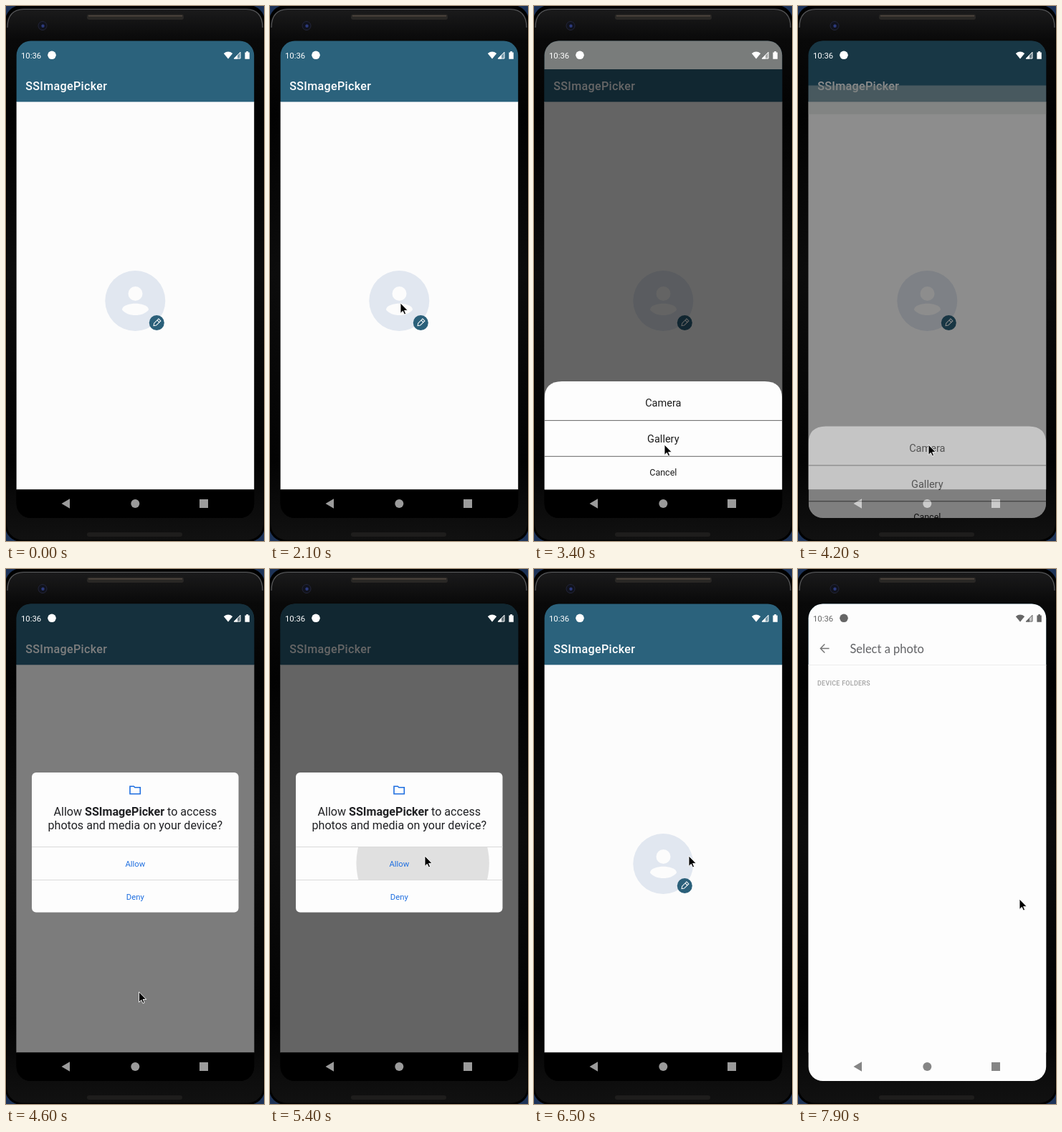
These frames come from a looping animation (360 by 744 pixels, 8 s). An HTML page:

```html
<!DOCTYPE html>
<html lang="en">
<head>
<meta charset="utf-8">
<title>Image picker demo</title>
<style>
  html, body { margin: 0; width: 100%; height: 100%; overflow: hidden; background: #1d3358; }
  svg { display: block; }
  text { font-family: Roboto, sans-serif; }
  .mid { text-anchor: middle; }
  .title { font-weight: 500; font-size: 16.1px; letter-spacing: .32px; fill: #fff; }
  .row { font-size: 14.5px; fill: #1c1c1c; }
  .cancel { font-size: 12.5px; fill: #1c1c1c; }
  .ask { font-size: 16.1px; fill: #202124; }
  .ask tspan { font-weight: 700; }
  .action { font-size: 11.3px; fill: #1f6fe0; }
  .heading { font-family: Lato, sans-serif; font-size: 16.5px; fill: #626366; }
  .label { font-size: 8.9px; letter-spacing: .3px; font-weight: 500; fill: #a2a2a2; }
</style>
</head>
<body>
<svg width="360" height="744" viewBox="0 0 360 744">
  <defs>
    <clipPath id="screenClip"><rect x="14.6" y="48.6" width="331.6" height="663.4" rx="20"/></clipPath>
    <clipPath id="allowClip"><rect x="36" y="387" width="288.5" height="45"/></clipPath>
    <linearGradient id="body" x2="0" y2="1">
      <stop offset="0" stop-color="#1b1b1c"/>
      <stop offset=".06" stop-color="#090909"/>
      <stop offset=".2" stop-color="#020202"/>
      <stop offset=".5" stop-color="#0c0c0c"/>
      <stop offset=".85" stop-color="#030303"/>
      <stop offset="1" stop-color="#111"/>
    </linearGradient>
    <g id="nav">
      <path d="M77.5 692L89 685.2V698.8Z"/>
      <circle cx="180.3" cy="692" r="6"/>
      <rect x="270" y="686" width="12" height="12"/>
    </g>
  </defs>

  <!-- phone -->
  <rect x="-1" y="-1" width="362" height="746" rx="22"/>
  <rect x="1" y="3.5" width="358" height="739" rx="22" fill="url(#body)"/>
  <path d="M2 30Q2 5 25 4.5H335Q358 5 358 30" fill="none" stroke="#58595b" stroke-width="1.2"/>
  <rect x="113" y="11.5" width="135" height="7.5" rx="3" fill="#292725"/>
  <path d="M115 13.8H246" stroke="#51473f" stroke-width="1.6"/>
  <rect x="113" y="732" width="133" height="6" rx="3" fill="#1e1d1c"/>
  <circle cx="51" cy="27.5" r="6" fill="#10121c" stroke="#24263a"/>
  <circle cx="51.5" cy="27.8" r="2.2" fill="#2c3a7c"/>

  <g clip-path="url(#screenClip)">
    <rect x="14" y="48" width="333" height="665"/>

    <!-- home -->
    <rect x="14" y="133" width="333" height="539.5" fill="#fcfcfc"/>
    <rect x="14" y="48" width="333" height="85.3" fill="#2b627c"/>
    <text class="title" x="27.2" y="116.7">SSImagePicker</text>
    <circle cx="180.3" cy="410" r="42" fill="#e1e7f0"/>
    <g fill="#fcfcfc">
      <circle cx="180.5" cy="400" r="10"/>
      <path d="M162 422.5C162 416 174 413.8 180.5 413.8S199 416 199 422.5C195 427.5 188 430 180.5 430S166 427.5 162 422.5Z"/>
    </g>
    <circle cx="210.3" cy="440.5" r="10.5" fill="#2b607a"/>
    <path transform="translate(210.3 440.5) rotate(45)" d="M-2.1 -5.8H2.1V3L0 6L-2.1 3ZM-2.1 -3H2.1" fill="none" stroke="#fff"/>
    <rect id="dim" x="14" y="48" width="333" height="625"/>

    <!-- permission dialog -->
    <g id="dialog">
      <rect x="36" y="283" width="288.5" height="194.5" rx="6" fill="#fdfdfd"/>
      <path d="M173 302.2H178.3L179.8 303.8H187.3V312.7H173Z" fill="none" stroke="#1f6fe0" stroke-width="1.6"/>
      <text class="ask mid" x="180.3" y="343">Allow <tspan>SSImagePicker</tspan> to access</text>
      <text class="ask mid" x="180.3" y="362">photos and media on your device?</text>
      <g clip-path="url(#allowClip)"><circle id="ripple" cy="409" fill="#e0e0e0"/></g>
      <path d="M36 386.5H324.5M36 432.5H324.5" stroke="#dadada"/>
      <text class="action mid" x="180.3" y="413.7">Allow</text>
      <text class="action mid" x="180.3" y="459.7">Deny</text>
    </g>

    <rect x="14" y="672.5" width="333" height="40"/>
    <use href="#nav" fill="#9b9b9b"/>

    <!-- bottom sheet window -->
    <g id="sheet">
      <rect x="14" y="48" width="333" height="40" fill="#797c7b"/>
      <path d="M14.6 672.5V546Q14.6 522 39 522H322Q346.2 522 346.2 546V672.5Z" fill="#fdfdfd"/>
      <path d="M14 576.4H347M14 626.3H347" stroke="#555" stroke-width=".9"/>
      <text class="row mid" x="180.3" y="557">Camera</text>
      <text class="row mid" x="180.3" y="607">Gallery</text>
      <text class="cancel mid" x="180.3" y="652.6">Cancel</text>
    </g>

    <!-- photo picker -->
    <g id="picker">
      <rect x="14" y="48" width="333" height="665" fill="#fdfdfd"/>
      <g id="toolbar">
        <path d="M14 133.5H347" stroke="#ececec"/>
        <path d="M43.5 110.5H32M37.3 104.6L31.4 110.5L37.3 116.4" fill="none" stroke="#747474" stroke-width="1.4"/>
        <text class="heading" x="72.4" y="116.8">Select a photo</text>
      </g>
      <text class="label" id="folders" x="27" y="162.4">DEVICE FOLDERS</text>
      <use href="#nav" fill="#858585"/>
    </g>

    <!-- status bar -->
    <g id="statusBar">
      <text x="21" y="72.6" font-size="11.3">10:36</text>
      <circle cx="64" cy="68.3" r="5.8"/>
      <path d="M303.8 66Q310 61.2 316.2 66L310 73.6Z"/>
      <path d="M327 64.2V73H318.3Z" fill-opacity=".35" stroke="currentColor"/>
      <path d="M323 68.2V73.5H317.7Z"/>
      <path d="M333.4 64.4H335.2V63H338V64.4H339.8V73.8H333.4Z"/>
    </g>
  </g>

  <path id="cursor" d="M0 0V14.4L3.3 11.3L5.5 16L7.6 15.1L5.6 10.4H10.2Z" stroke="#fff" stroke-width=".9"/>
</svg>
<script>
const LOOP = 8000, STEP = 100;
const $ = id => document.getElementById(id);

const ramp = (t, from, to) => Math.min(1, Math.max(0, (t - from) / (to - from)));
const easeOut = (p, power) => 1 - (1 - p) ** power;
const smooth = (t, from, to) => {
  const p = ramp(t, from, to);
  return p * p * (3 - 2 * p);
};

function set(id, attrs) {
  for (const key in attrs) $(id).setAttribute(key, attrs[key]);
}

// Fades a layer in while it rises by the given distance.
function rise(id, shown, distance = 0) {
  set(id, { opacity: shown, transform: `translate(0 ${distance * (1 - shown)})` });
}

function drawCursor(t) {
  const enter = smooth(t, 0, 700);
  const toGallery = smooth(t, 2600, 3100);
  const toAllow = smooth(t, 4500, 5000);
  const toCorner = smooth(t, 6900, 7900);
  const x = 365 - 183 * enter + 34 * toAllow + 93 * toCorner;
  const y = 560 - 147 * enter + 197 * toGallery - 211 * toAllow + 60 * toCorner;
  set('cursor', { transform: `translate(${x} ${y})` });
}

function draw(t) {
  const sheetDim = easeOut(ramp(t, 2200, 2610), 2) - smooth(t, 4050, 4500);
  const dialogDim = smooth(t, 4300, 4700) - smooth(t, 5900, 6300);
  set('dim', { opacity: .6 * Math.max(sheetDim, dialogDim) });

  rise('sheet', smooth(t, 2200, 2500) - smooth(t, 4100, 4300), 125);
  rise('dialog', smooth(t, 4350, 4600) - smooth(t, 5900, 6200));
  rise('picker', smooth(t, 6500, 6900), 45);
  rise('toolbar', smooth(t, 6900, 7200));
  rise('folders', smooth(t, 7700, 7900));

  set('ripple', {
    cx: 217 - 37 * smooth(t, 5300, 5800),
    r: 190 * easeOut(ramp(t, 5300, 5800), 3)
  });

  const ink = t < 6800 ? '#fff' : '#666';
  set('statusBar', { fill: ink, color: ink });
  drawCursor(t);
}

function tick() {
  draw(Math.floor(performance.now() % LOOP / STEP) * STEP);
  requestAnimationFrame(tick);
}
tick();
</script>
</body>
</html>
```
